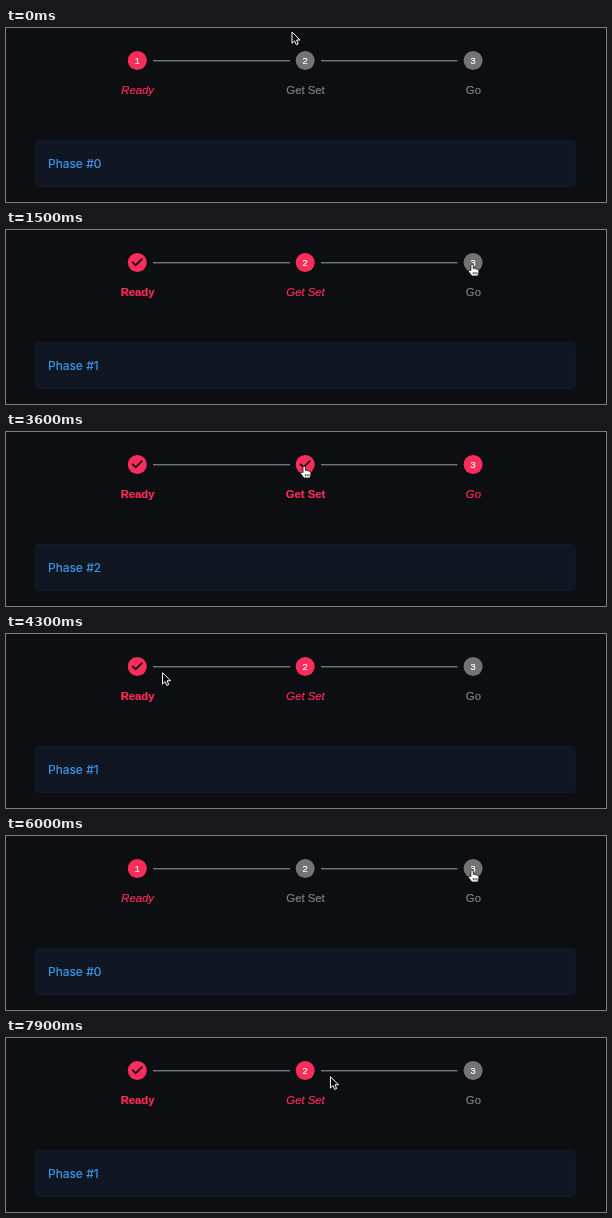
Recreate the animation shown at these times as an HTML page. Size 600 by 174 pixels, loop 8 s.

```html
<!DOCTYPE html>
<html lang="en">
<head>
<meta charset="utf-8">
<style>
  html, body { margin: 0; width: 100%; height: 100%; overflow: hidden; background: #0d0e12; }
  svg { display: block; }
  text { font-family: "Liberation Sans", Arial, sans-serif; stroke: currentColor; stroke-width: .2px; }
  .step { color: #818183; fill: currentColor; }
  .step text { text-anchor: middle; }
  .step circle { fill: #737375; }
  .step .number { font-size: 9.3px; color: #fff; fill: #fff; }
  .label { font-size: 11.3px; }
  .check { fill: #0d0e12; visibility: hidden; }
  .active, .done { color: #fa2d5b; }
  .active circle, .done circle { fill: currentColor; }
  .active .label { font-style: italic; }
  .done .label { font-weight: bold; }
  .done .check { visibility: visible; }
  .done .number { visibility: hidden; }
  #phase { font: 12px Inter, sans-serif; color: #4097ec; fill: currentColor; }
</style>
</head>
<body>
<svg width="600" height="174" viewBox="0 0 600 174">
  <path d="M147 32.8H284M315 32.8H451.5" stroke="#b0b0b2" stroke-width=".9"/>
  <g id="steps"></g>
  <rect x="29.5" y="112.5" width="539.5" height="46" rx="3" fill="#101722" stroke="#111d2c"/>
  <text id="phase" x="42" y="140"></text>
  <path id="arrow" d="M0 0V11.3L2.6 8.8 4.3 12.7 6.2 11.9 4.6 8H8.1Z" fill="#08080a" stroke="#fff"/>
  <g id="hand" stroke="#111" stroke-width=".8" stroke-linejoin="round">
    <path fill="#fff" d="M-1.2 6V.9Q-1.2-.3 0-.3T1.2.9V4Q2.6 3.2 3.4 4.4 4.7 3.8 5.3 5 6.7 4.6 6.7 6.2V8Q6.4 10 5.5 11.5H-.3Q-1.5 9.4-3.6 7.2-3.9 5.7-2.5 5.8Z"/>
    <path fill="none" d="M1.2 7.6V9.8M3 7.6V9.8M4.8 7.6V9.8"/>
  </g>
</svg>
<script>
  const LOOP = 8000, TICK = 100, DWELL = 100;
  const STEP_Y = 32.5, FIRST_X = 131.3, SPACING = 167.9, HOVER_RADIUS = 7.5;
  const labels = ["Ready", "Get Set", "Go"];
  const stepX = i => FIRST_X + i * SPACING;

  // The pointer's visits to the steps; the last one is cut off by the loop.
  const visits = [
    [400, 700, 1], [1500, 1800, 2], [2570, 2800, 0], [3500, 3900, 1],
    [4400, 4600, 0], [5650, 6600, 2], [7400, 7600, 1], [8500, 8800, 2]
  ].map(([arrive, click, step]) => ({ arrive, click, step, x: stepX(step) - 1, y: STEP_Y + 2 }));
  const start = { click: -DWELL, x: 286, y: 4 };

  const byId = id => document.getElementById(id);
  const smooth = k => k * k * (3 - 2 * k);

  // Only a neighbour of the current step reacts to a click.
  const phaseAt = t => visits.reduce((phase, { click, step }) =>
    click <= t && Math.abs(step - phase) === 1 ? step : phase, 0);

  function pointerAt(t) {
    const next = visits.findIndex(v => t < v.click + DWELL);
    const to = visits[next], from = visits[next - 1] || start;
    const left = from.click + DWELL;
    const k = smooth(Math.min(1, (t - left) / (to.arrive - left)));
    // Short hops sag, long ones arch.
    const span = Math.abs(to.x - from.x) / SPACING;
    const lift = 4.5 * span * (3 * span - 5) * Math.sin(Math.PI * k);
    return [from.x + (to.x - from.x) * k, from.y + (to.y - from.y) * k - lift];
  }

  byId("steps").innerHTML = labels.map((label, i) => `
    <g class="step" transform="translate(${stepX(i)} ${STEP_Y})">
      <circle r="9.5"/>
      <text class="number" y="3.3">${i + 1}</text>
      <path class="check" transform="scale(.79) translate(-12 -12)"
        d="M10 17.2l-5.2-5.2 1.6-1.6 3.6 3.6 7.6-7.6L19.2 8z"/>
      <text class="label" x=".3" y="33.5">${label}</text>
    </g>`).join("");
  const stepNodes = [...byId("steps").children];

  function render(now) {
    const t = Math.floor(now % LOOP / TICK) * TICK;
    const phase = phaseAt(t);
    stepNodes.forEach((node, i) => {
      const state = i < phase ? "done" : i === phase ? "active" : "";
      node.setAttribute("class", `step ${state}`);
    });
    byId("phase").textContent = `Phase #${phase}`;

    const [x, y] = pointerAt(t);
    const hovering = labels.some((_, i) => Math.hypot(x - stepX(i), y - STEP_Y) < HOVER_RADIUS);
    for (const [id, shown] of [["arrow", !hovering], ["hand", hovering]]) {
      byId(id).setAttribute("transform", `translate(${x} ${y})`);
      byId(id).setAttribute("visibility", shown ? "visible" : "hidden");
    }
    requestAnimationFrame(render);
  }
  render(performance.now());
</script>
</body>
</html>
```
